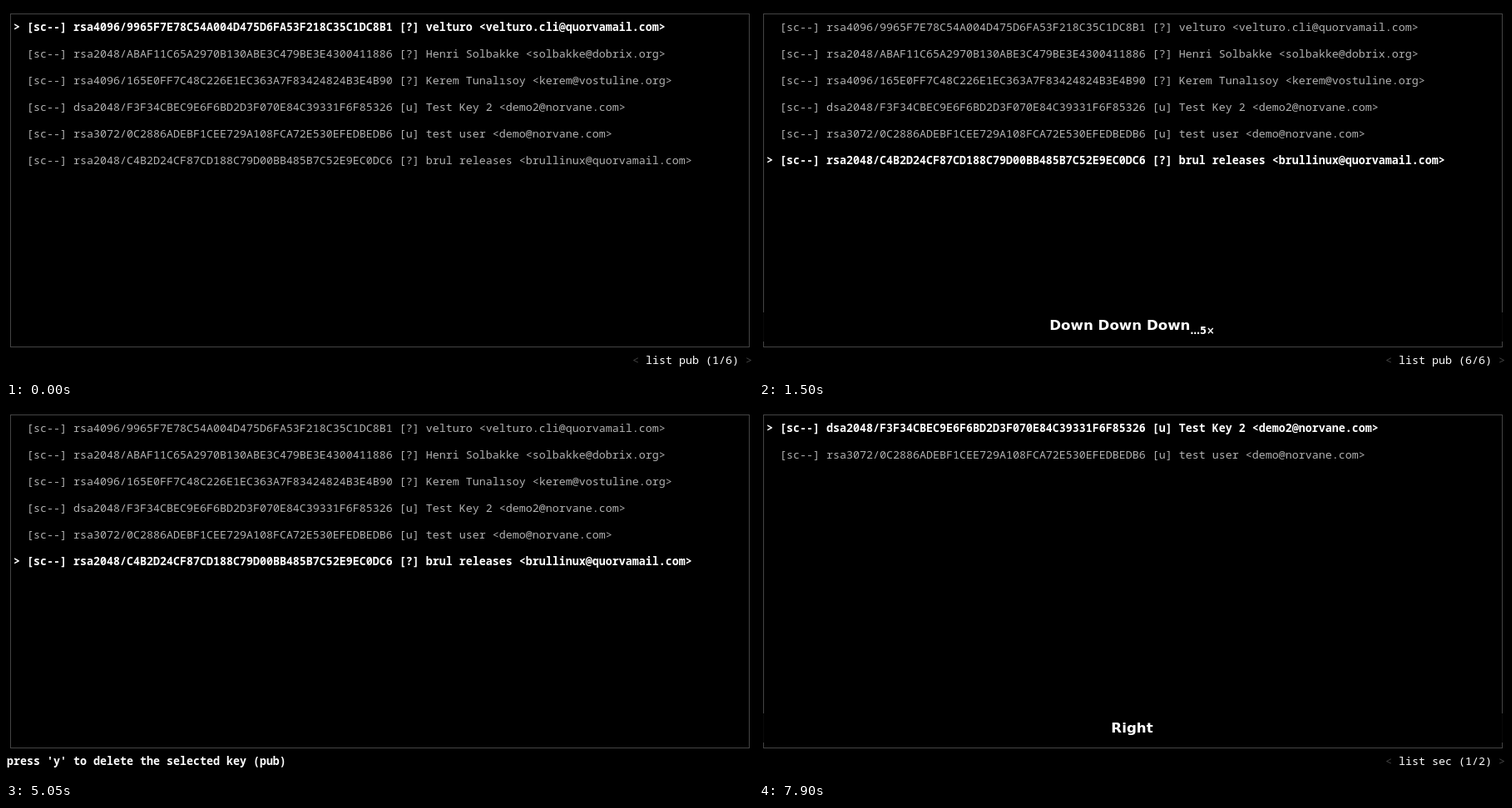
Recreate the animation shown at these times as an HTML page. Size 898 by 448 pixels, loop 8000 ms.

```html
<!DOCTYPE html>
<html lang="en">
<head>
<meta charset="utf-8">
<title>Key list</title>
<style>
  html, body { margin: 0; width: 100%; height: 100%; overflow: hidden; background: #000; }
  svg { display: block; width: 898px; height: 448px; }
  text { white-space: pre; }
  .term { font: 13.3333px "Noto Sans Mono", "DejaVu Sans Mono", monospace; fill: #b2b2b2; }
  .lit { fill: #fff; }
  .dim { fill: #444; }
  .bold { fill: #fff; font-weight: 700; }
  .caption { font: 700 16.6667px "DejaVu Sans", sans-serif; text-anchor: middle; }
  .small { font-size: 11.57px; }
</style>
</head>
<body>
<svg id="stage" viewBox="0 0 898 448"></svg>
<script>
const LOOP = 8000, CELL = 8, ROW = 16, MID = 448.5;
const stage = document.getElementById('stage');

const KEYS = [
  'rsa4096/9965F7E78C54A004D475D6FA53F218C35C1DC8B1 [?] velturo <velturo.cli@quorvamail.com>',
  'rsa2048/ABAF11C65A2970B130ABE3C479BE3E4300411886 [?] Henri Solbakke <solbakke@dobrix.org>',
  'rsa4096/165E0FF7C48C226E1EC363A7F83424824B3E4B90 [?] Kerem Tunalısoy <kerem@vostuline.org>',
  'dsa2048/F3F34CBEC9E6F6BD2D3F070E84C39331F6F85326 [u] Test Key 2 <demo2@norvane.com>',
  'rsa3072/0C2886ADEBF1CEE729A108FCA72E530EFEDBEDB6 [u] test user <demo@norvane.com>',
  'rsa2048/C4B2D24CF87CD188C79D00BB485B7C52E9EC0DC6 [?] brul releases <brullinux@quorvamail.com>'
].map(k => '[sc--] ' + k);

const BRIGHT = '#fff';
const START = { kind: 'pub', keys: KEYS, sel: 0, prompt: '', bar: false,
                head: '', last: '', small: false, ink: BRIGHT, line: '' };

// A key press: caption head, last underlined part, small suffix or not.
const press = (head, last, small = false) =>
  ({ bar: true, head, last, small, ink: BRIGHT, line: BRIGHT });
const settle = { line: '' };
const hide = ink => ({ bar: false, line: '', ink });

const STEPS = [
  [500, { ...press('', 'Down'), sel: 1 }],
  [700, { ...press('Down ', 'Down'), sel: 2 }],
  [850, press('Down Down ', 'Down')],
  [900, { sel: 3 }],
  [1050, { line: '#333' }],
  [1100, { ...press('Down Down Down', '…4×', true), sel: 4 }],
  [1250, settle],
  [1300, press('Down Down Down', '…5×', true)],
  [1350, { sel: 5 }],
  [1500, settle],
  [3000, hide('#111')],
  [3350, { ...press('', 'Backspace'), prompt: "press 'y' to delete the selected key (pub)" }],
  [3550, settle],
  [5050, hide('#000')],
  [5450, { ...press('', 'y'), prompt: '', keys: KEYS.slice(0, 5), sel: 0 }],
  [5650, settle],
  [7150, hide('#161616')],
  [7700, { ...press('', 'Right'), kind: 'sec', keys: KEYS.slice(3, 5), sel: 0 }],
  [7900, settle]
];

function add(parent, tag, attrs = {}) {
  const el = document.createElementNS('http://www.w3.org/2000/svg', tag);
  for (const name in attrs) el.setAttribute(name, attrs[name]);
  return parent.appendChild(el);
}

// Terminal text at a column and row of the character grid.
function cellText(col, row, cls = '', text = '') {
  const el = add(stage, 'text', { x: 1 + col * CELL, y: 14 + row * ROW, class: 'term ' + cls });
  el.textContent = text;
  return el;
}

add(stage, 'rect', { width: 898, height: 448, fill: '#000' });
add(stage, 'rect', { x: 5.5, y: 9.5, width: 888, height: 400, fill: 'none', stroke: '#444' });

const cursor = cellText(1, 1, 'bold', '>');
const rows = KEYS.map((_, i) => cellText(3, 1 + 2 * i));
const prompt = cellText(0, 26, 'bold');
const status = cellText(96, 26, 'lit');
const arrows = [cellText(94, 26, 'dim', '<'), cellText(111, 26, 'dim', '>')];

const bar = add(stage, 'rect', { y: 368, width: 898, height: 35, fill: '#000', opacity: 0.86 });
const caption = add(stage, 'text', { x: MID, class: 'caption' });
const head = add(caption, 'tspan');
const last = add(caption, 'tspan');
const line = add(stage, 'rect', { height: 1.4 });

const show = (el, on) => el.setAttribute('visibility', on ? 'visible' : 'hidden');

function draw(s) {
  rows.forEach((row, i) => {
    row.textContent = s.keys[i] || '';
    row.setAttribute('class', i === s.sel ? 'term bold' : 'term');
  });
  cursor.setAttribute('y', 30 + s.sel * 2 * ROW);

  prompt.textContent = s.prompt;
  status.textContent = s.prompt ? '' : `list ${s.kind} (${s.sel + 1}/${s.keys.length})`;
  arrows.forEach(a => show(a, !s.prompt));

  show(bar, s.bar);
  show(caption, s.last && s.ink !== '#000');
  caption.setAttribute('y', s.small ? 389 : 391);
  caption.setAttribute('fill', s.ink);
  head.textContent = s.head;
  last.textContent = s.last;
  last.setAttribute('class', s.small ? 'small' : '');
  last.setAttribute('dy', s.small ? 5 : 0);

  show(line, s.line);
  if (s.line) {
    const w = last.getComputedTextLength();
    line.setAttribute('x', MID + caption.getComputedTextLength() / 2 - w);
    line.setAttribute('y', s.small ? 394 : 391);
    line.setAttribute('width', w);
    line.setAttribute('fill', s.line);
  }
}

let shown = -1;
function tick() {
  const t = performance.now() % LOOP;
  const count = STEPS.filter(([at]) => at <= t).length;
  if (count !== shown) {
    shown = count;
    draw(Object.assign({}, START, ...STEPS.slice(0, count).map(step => step[1])));
  }
  requestAnimationFrame(tick);
}
tick();
</script>
</body>
</html>
```
